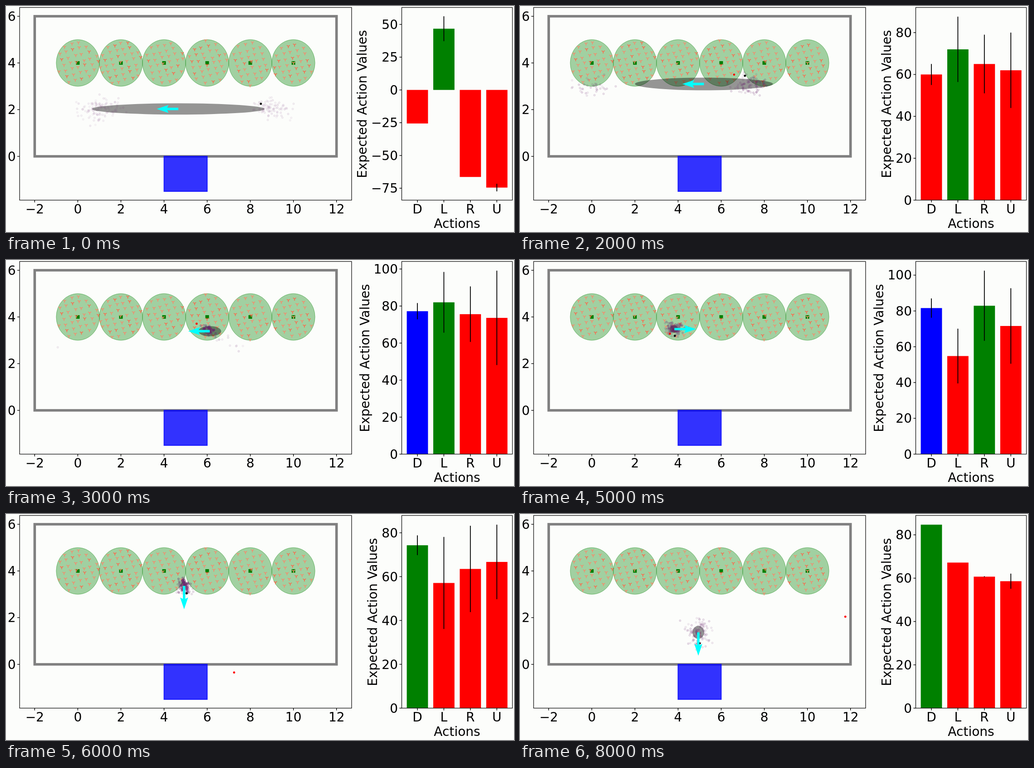
These frames come from a looping animation (1120 px wide and 500 px high, 9000 ms). An HTML page with a canvas:

```html
<!DOCTYPE html>
<html lang="en">
<head>
<meta charset="utf-8">
<title>Belief and action values</title>
<style>
html, body { margin: 0; width: 100%; height: 100%; overflow: hidden; background: #fcfdfb; }
canvas { display: block; }
</style>
</head>
<body>
<canvas id="stage" width="1120" height="500"></canvas>
<script>
const ctx = document.getElementById('stage').getContext('2d');
const STEP = 1000, TOP = 3.3, BOTTOM = 429.5, HEIGHT = BOTTOM - TOP;
const X_SCALE = 732 / 15.4;
const px = x => 30 + (x + 2.7) * X_SCALE;
const DIRECTIONS = { D: [0, -1], L: [-1, 0], R: [1, 0], U: [0, 1] };

// Positions are in plot units. cloud: [x, y, spreadX, spreadY, count, alpha]
// ellipse: [x, y, rx, ry]; values and errors are ordered D, L, R, U.
const steps = [
  { at: [4.66, 2.03], action: 'L', ellipse: [4.66, 2.03, 4, .24], black: [8.49, 2.25],
    clouds: [[1, 2.02, .5, .24, 110, .08], [9.05, 2.05, .42, .23, 90, .08]],
    values: [-25.6, 46.7, -66.4, -74.5], errors: [0, 9.5, 0, 2.9], colors: 'rgrr' },
  { at: [3.45, 2.03], action: 'U', ellipse: [3.45, 2.03, 3.97, .28], black: [7.14, 2.53], red: [3.75, 4.74],
    clouds: [[.15, 2.1, .5, .27, 75, .15], [7.95, 2.03, .42, .25, 75, .15]],
    values: [-25.4, -65, -52, 68.9], errors: [0, .3, 0, 22.7], colors: 'rrrg' },
  { at: [5.2, 3.1], action: 'L', ellipse: [5.2, 3.1, 3.2, .27], black: [7.1, 3.45], red: [6.6, 3.5],
    clouds: [[0, 2.95, .45, .25, 40, .14], [7.35, 3.12, .4, .24, 90, .17]],
    values: [60, 72, 65, 62], errors: [5, 15.6, 14, 18], colors: 'rgrr' },
  { at: [6.12, 3.39], action: 'L', ellipse: [6.12, 3.39, .53, .22], black: [5.9, 3.38], red: [5.51, 3.71],
    clouds: [[6.02, 3.43, .18, .12, 55, .4], [7, 2.8, .42, .3, 11, .1], [-.93, 2.7, 0, 0, 1, .1]],
    values: [77.2, 82, 75.6, 73.6], errors: [4.4, 16.4, 15, 25.5], colors: 'bgrr' },
  { at: [4.97, 3.43], action: 'L', ellipse: [4.97, 3.43, .25, .17], black: [4.95, 3.27], red: [4.7, 3.6],
    clouds: [[4.95, 3.45, .2, .15, 100, .25]],
    values: [79.5, 86, 80, 73], errors: [5, 22.2, 17, 23], colors: 'bgrr' },
  { at: [3.83, 3.48], action: 'R', ellipse: [3.82, 3.48, .2, .16], black: [3.85, 3.19], red: [3.62, 3.28],
    clouds: [[3.82, 3.48, .2, .14, 120, .24]],
    values: [81.6, 54.8, 82.9, 71.6], errors: [5.4, 15.3, 19.6, 21.1], colors: 'brgr' },
  { at: [4.93, 3.36], action: 'D', ellipse: [4.93, 3.4, .15, .17], black: [5.05, 3.04], red: [7.25, -.35],
    clouds: [[4.92, 3.4, .12, .15, 90, .3], [4.95, 3.13, .25, .07, 28, .2]],
    values: [74.3, 57.1, 63.5, 66.7], errors: [4.5, 21, 19.7, 17], colors: 'grrr' },
  { at: [4.94, 2.37], action: 'D', ellipse: [4.94, 2.37, .22, .24], black: [4.99, 1.97], red: [8.5, -1.71],
    clouds: [[4.95, 2.38, .26, .24, 100, .17]],
    values: [78, 62, 62, 62.5], errors: [.2, 8, 6, 9], colors: 'grrr' },
  { at: [4.94, 1.37], action: 'D', ellipse: [4.94, 1.37, .27, .28], black: [5, .9], red: [11.76, 2.04],
    clouds: [[4.97, 1.38, .3, .28, 105, .15]],
    values: [84.7, 67.2, 60.7, 58.6], errors: [0, 0, .2, 3.5], colors: 'grrr' }
];
const COLORS = { r: '#f00', g: '#008000', b: '#00f' };

function seeded(seed) {
  return () => {
    seed = (Math.imul(seed, 1664525) + 1013904223) >>> 0;
    return seed / 4294967296;
  };
}
const bell = random => (random() + random() + random() + random() - 2) * 1.73;

function line(points, color = '#000', width = 1.4) {
  ctx.beginPath();
  points.forEach(([x, y]) => ctx.lineTo(x, y));
  ctx.strokeStyle = color;
  ctx.lineWidth = width;
  ctx.stroke();
}

function oval(x, y, rx, ry, fill, stroke) {
  ctx.beginPath();
  ctx.ellipse(x, y, rx, ry, 0, 0, 2 * Math.PI);
  ctx.fillStyle = fill;
  ctx.fill();
  if (stroke) {
    ctx.strokeStyle = stroke;
    ctx.lineWidth = 1;
    ctx.stroke();
  }
}

function label(text, x, y, align = 'center') {
  ctx.fillStyle = '#000';
  ctx.textAlign = align;
  ctx.fillText(text, x, y);
}

function frame(x, width) {
  ctx.strokeStyle = '#000';
  ctx.lineWidth = 1.2;
  ctx.strokeRect(x, TOP, width, HEIGHT);
}

const number = n => String(n).replace('-', '\u2212');

function yTick(value, axisX, y) {
  line([[axisX - 5, y], [axisX, y]]);
  label(number(value), axisX - 8.5, y + 10, 'right');
}

function xTick(text, x) {
  line([[x, BOTTOM], [x, BOTTOM + 5]]);
  label(text, x, 459);
}

function tree(index, py) {
  const x = px(index * 2), y = py(4), rx = X_SCALE, ry = py(3) - y;
  oval(x, y, rx, ry, 'rgba(0,128,0,.36)', 'rgba(0,128,0,.45)');
  ctx.fillStyle = '#008000';
  ctx.fillRect(x - 4, y - 4, 8, 8);

  const random = seeded(index * 7919 + 31);
  const shiftX = random() * 10 - 5, shiftY = random() * 8 - 4;
  for (let row = -5; row <= 5; row++) {
    for (let col = -5; col <= 5; col++) {
      const dx = col * 14.8 + row * 4 + shiftX + random() * 4 - 2;
      const dy = row * 12.6 - col * 3.8 + shiftY + random() * 4 - 2;
      const color = random() < .3 ? '#fb6a4c' : '#f58b6c';
      if (Math.hypot(dx / rx, dy / ry) > .97) continue;
      const mx = x + dx, my = y + dy;
      line([[mx - 3.4, my - 2.2], [mx, my], [mx + 3.4, my - 2.2]], color, 1.6);
      line([[mx, my], [mx, my + 4]], color, 1.6);
    }
  }
}

function particles(clouds, py, seed) {
  const random = seeded(seed);
  for (const [x, y, sx, sy, count, alpha] of clouds) {
    for (let i = 0; i < count; i++) {
      const a = alpha * (.6 + random() * .8);
      oval(px(x + bell(random) * sx), py(y + bell(random) * sy), 2.1, 2.1,
        `rgba(105,35,110,${a * .65})`, `rgba(105,35,110,${a})`);
    }
  }
}

function arrow([x, y], action, py) {
  const [dx, dy] = DIRECTIONS[action];
  const length = dx ? X_SCALE : py(0) - py(1);
  ctx.save();
  ctx.translate(px(x), py(y));
  ctx.rotate(Math.atan2(-dy, dx));
  const neck = length - 23, barb = length - 26;
  ctx.beginPath();
  [[0, -2.7], [neck, -2.7], [barb, -8.8], [length, 0], [barb, 8.8], [neck, 2.7], [0, 2.7]]
    .forEach(point => ctx.lineTo(...point));
  ctx.fillStyle = '#0ff';
  ctx.fill();
  ctx.restore();
}

function drawWorld(step, seed) {
  const lowest = Math.min(-1.5, step.red ? step.red[1] : 0);
  const margin = (6 - lowest) * .05, low = lowest - margin;
  const scale = HEIGHT / (6 + margin - low);
  const py = y => BOTTOM - (y - low) * scale;

  ctx.strokeStyle = '#808080';
  ctx.lineWidth = 5.6;
  ctx.strokeRect(px(-2), py(6), 14 * X_SCALE, 6 * scale);
  ctx.fillStyle = 'rgba(0,0,255,.8)';
  ctx.strokeStyle = 'rgba(0,0,255,.8)';
  ctx.lineWidth = 2;
  ctx.fillRect(px(4), py(0), 2 * X_SCALE, 1.5 * scale);
  ctx.strokeRect(px(4), py(0), 2 * X_SCALE, 1.5 * scale);

  for (let i = 0; i < 6; i++) tree(i, py);
  const [x, y, rx, ry] = step.ellipse;
  oval(px(x), py(y), rx * X_SCALE, ry * scale, 'rgba(0,0,0,.41)');
  particles(step.clouds, py, seed);
  oval(px(step.black[0]), py(step.black[1]), 2.4, 2.4, '#000');
  if (step.red) oval(px(step.red[0]), py(step.red[1]), 2.4, 2.4, '#f00');
  arrow(step.at, step.action, py);

  frame(30, 732);
  for (let v = -2; v <= 12; v += 2) xTick(number(v), px(v));
  for (let v = -2; v <= 6; v += 2) if (v >= low) yTick(v, 30, py(v));
}

function drawValues({ values, errors, colors }) {
  const left = 872.5;
  const highest = Math.max(...values.map((v, i) => v + errors[i]));
  const lowest = Math.min(0, ...values.map((v, i) => v - errors[i]));
  const margin = (highest - lowest) * .05;
  const low = lowest < 0 ? lowest - margin : 0, high = highest + margin;
  const py = v => BOTTOM - (v - low) / (high - low) * HEIGHT;

  values.forEach((value, i) => {
    const x = 907 + i * 58.4;
    ctx.fillStyle = COLORS[colors[i]];
    ctx.fillRect(x - 23.4, py(value), 46.8, py(0) - py(value));
    if (errors[i]) line([[x, py(value - errors[i])], [x, py(value + errors[i])]], '#000', 1.8);
    xTick('DLRU'[i], x);
  });
  frame(left, 244);

  const tickStep = high - low > 125 ? 25 : 20;
  let widest = 0;
  for (let v = Math.ceil(low / tickStep) * tickStep; v <= high; v += tickStep) {
    yTick(v, left, py(v));
    widest = Math.max(widest, ctx.measureText(number(v)).width);
  }
  label('Actions', 994.5, 491);
  ctx.save();
  ctx.translate(left - 18.5 - widest, 217);
  ctx.rotate(-Math.PI / 2);
  label('Expected Action Values', 0, 0);
  ctx.restore();
}

function draw(index) {
  ctx.fillStyle = '#fcfdfb';
  ctx.fillRect(0, 0, 1120, 500);
  ctx.font = '28px "DejaVu Sans", sans-serif';
  drawWorld(steps[index], index * 101 + 17);
  drawValues(steps[index]);
}

const start = performance.now();
let shown = -1;
function tick() {
  const index = Math.floor((performance.now() - start) / STEP) % steps.length;
  if (index !== shown) draw(shown = index);
  requestAnimationFrame(tick);
}
tick();
</script>
</body>
</html>
```
